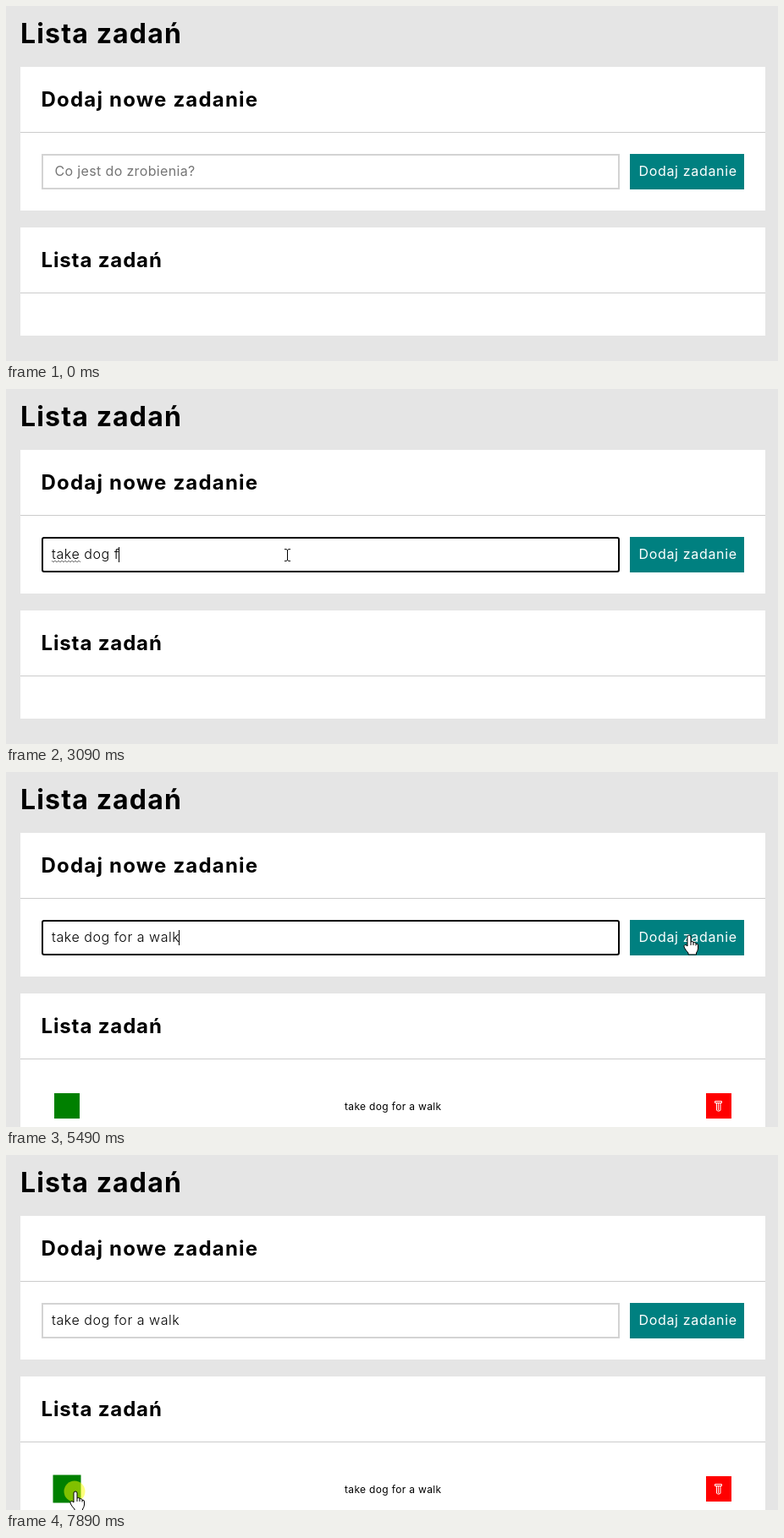
An HTML page that plays this animation: 912 px wide and 420 px high, repeating every 8000 ms.

```html
<!DOCTYPE html>
<html lang="pl">
<head>
<meta charset="utf-8">
<title>Lista zadań</title>
<style>
  html, body { margin: 0; width: 100%; height: 100%; overflow: hidden; background: #e5e5e5; }
  svg { display: block; width: 912px; height: 420px; }
  text { font-family: Montserrat, Inter, sans-serif; white-space: pre; }
  .h1 { font-size: 32px; font-weight: 700; letter-spacing: .036em; }
  .h2 { font-size: 24px; font-weight: 700; letter-spacing: .036em; }
  .wide { letter-spacing: .05em; }
  .body { font-size: 16px; letter-spacing: .042em; }
  .field { font-weight: 350; letter-spacing: .034em; }
  .hint { fill: #757575; letter-spacing: .022em; }
  .small { font-size: 12px; letter-spacing: .028em; }
  .card { fill: #fff; }
  .rule { fill: #ccc; }
  .pointer { fill: #fff; stroke: #000; stroke-linejoin: round; }
</style>
</head>
<body>
<svg viewBox="0 0 912 420">
  <rect width="912" height="420" fill="#e5e5e5"/>
  <text class="h1" x="17" y="44">Lista zadań</text>

  <rect class="card" x="17" y="72" width="880" height="170"/>
  <rect class="rule" x="17" y="149" width="880" height="1"/>
  <text class="h2 wide" x="41.5" y="119">Dodaj nowe zadanie</text>
  <rect id="input" x="43" y="176" width="681" height="40" fill="#fff" stroke-width="2"/>
  <text id="hint" class="body hint" x="57.5" y="201">Co jest do zrobienia?</text>
  <text id="typed" class="body field" x="54" y="201"></text>
  <path id="squiggle" fill="none" stroke="#666" stroke-width=".9"/>
  <rect id="caret" y="187" width="1" height="18"/>
  <g id="add">
    <rect x="737" y="175" width="135" height="42" fill="#008080"/>
    <text id="addLabel" class="body" x="747.5" y="201">Dodaj zadanie</text>
  </g>

  <rect id="listCard" class="card" x="17" y="262" width="880"/>
  <rect class="rule" x="17" y="339" width="880" height="1"/>
  <text class="h2" x="41.5" y="309">Lista zadań</text>
  <g id="row">
    <rect id="done" x="57" y="380" width="30" height="30" fill="#008000"/>
    <text class="small" x="400" y="400">take dog for a walk</text>
    <rect x="827" y="380" width="30" height="30" fill="#f00"/>
    <path d="M837.5 389.5h8v2h-8zM839.5 391.5v8.5l1 1h2.5l1-1v-8.5M841.7 392v8" fill="none" stroke="#fff"/>
  </g>

  <circle id="click" r="12.5" fill="#ff0" fill-opacity=".5"/>
  <g id="cursor">
    <path id="arrow" class="pointer" d="M0 0V16L3.7 12.5 6.2 18.3 8.6 17.2 6.2 11.6H11.3Z"/>
    <path id="beam" d="M-3 -6.5H-1L.5 -5.5 2 -6.5H4M.5 -5.5V6.5M-3 7.5H-1L.5 6.5 2 7.5H4" fill="none" stroke="#000"/>
    <path id="hand" class="pointer" transform="translate(1 1)" d="M-2 12V1Q-2 -1 0 -1T2 1V7Q3 6 5 7V8Q6.5 7 8 8.5V9.5Q10.5 8.5 10.5 11V15Q10 18 8.5 20V22H-1V20Q-4 17 -5.5 14Q-7 11.5 -5 10.5Q-3.5 10.5 -2 12ZM2 7v4M5 8v3M8 9.5v2"/>
  </g>
</svg>
<script>
const LOOP = 8000, BLINK = 530, FPS = 15;
const TASK = 'take dog for a walk';
const keyTimes = [1090, 1220, 1420, 1690, 1820, 2020, 2090, 2490, 2690, 3090,
  3220, 3350, 3420, 3550, 3680, 3880, 4010, 4140, 4340];
const focusSpans = [[550, 5350], [5420, 7820]];
const clickSpans = [[550, 620], [5350, 5490], [7820, LOOP]];
const ADDED = 5420, HOVER_DONE = 7530;
// time, x, y
const path = [[66, 735, 364], [480, 332, 195], [810, 332, 195], [820, 332, 196],
  [4760, 332, 196], [5270, 806, 193], [5980, 806, 193], [6150, 801, 198],
  [6330, 800, 202], [6390, 800, 202], [7120, 148, 368], [7465, 88, 394], [7600, 81, 398]];

const el = Object.fromEntries([...document.querySelectorAll('[id]')].map(e => [e.id, e]));
const set = (e, attrs) => { for (const k in attrs) e.setAttribute(k, attrs[k]); };
const show = (e, on) => { e.style.display = on ? '' : 'none'; };
const active = (spans, t) => spans.find(([from, to]) => t >= from && t < to);
const inside = (x, y, left, top, w, h) => x >= left && x <= left + w && y >= top && y <= top + h;
const scaleAbout = (s, x, y) => `translate(${x} ${y}) scale(${s}) translate(${-x} ${-y})`;

let wave = 'M54 203';
for (let x = 56, i = 0; x <= 89; x += 2, i++) wave += `L${x} ${i % 2 ? 203 : 205}`;
set(el.squiggle, { d: wave });

function cursorAt(t) {
  const i = path.findIndex(p => p[0] > t);
  if (i < 0) return path.at(-1).slice(1);
  if (i === 0) return path[0].slice(1);
  const [t0, x0, y0] = path[i - 1], [t1, x1, y1] = path[i];
  const u = (t - t0) / (t1 - t0), k = u * u * (3 - 2 * u);
  return [Math.round(x0 + (x1 - x0) * k), Math.round(y0 + (y1 - y0) * k)];
}

function drawInput(t) {
  const count = keyTimes.filter(k => k <= t).length;
  const focus = active(focusSpans, t);
  el.typed.textContent = TASK.slice(0, count);
  show(el.hint, !count);
  set(el.input, { stroke: focus ? '#000' : '#d3d3d3', rx: focus ? 2 : 0 });
  show(el.squiggle, focus === focusSpans[0] && t >= keyTimes[4]);
  const since = focus ? Math.max(focus[0], keyTimes[count - 1] || 0) : 0;
  show(el.caret, focus && Math.floor((t - since) / BLINK) % 2 === 0);
  set(el.caret, { x: Math.round(54 + (count ? el.typed.getComputedTextLength() : 0)) - (count ? 1 : 0) });
}

function drawCursor(t) {
  const [x, y] = cursorAt(Math.floor(t * FPS / 1000 + .01) * 1000 / FPS);
  const kind = inside(x, y, 42, 175, 683, 42) ? 'beam'
    : inside(x, y, 737, 175, 135, 42) || inside(x, y, 57, 380, 30, 30) ? 'hand' : 'arrow';
  show(el.cursor, t >= path[0][0]);
  for (const name of ['arrow', 'beam', 'hand']) show(el[name], name === kind);
  set(el.cursor, { transform: `translate(${x} ${y})` });
  show(el.click, active(clickSpans, t));
  set(el.click, { cx: x, cy: y });
}

function drawButtons(t) {
  const pressed = t >= 5350 && t < 5490;
  set(el.add, { transform: scaleAbout(pressed ? .985 : 1, 804.5, 196) });
  set(el.addLabel, { fill: pressed ? '#d8ebeb' : '#fff' });
  const grow = Math.min(1, Math.max(0, (t - HOVER_DONE) / 200));
  set(el.done, { transform: scaleAbout(1 + .1 * grow, 72, 395) });
}

function draw(t) {
  show(el.row, t >= ADDED);
  set(el.listCard, { height: t >= ADDED ? 180 : 128 });
  drawInput(t);
  drawButtons(t);
  drawCursor(t);
}

const start = performance.now();
function tick(now) {
  draw(Math.max(0, now - start) % LOOP);
  requestAnimationFrame(tick);
}
draw(0);
requestAnimationFrame(tick);
</script>
</body>
</html>
```
